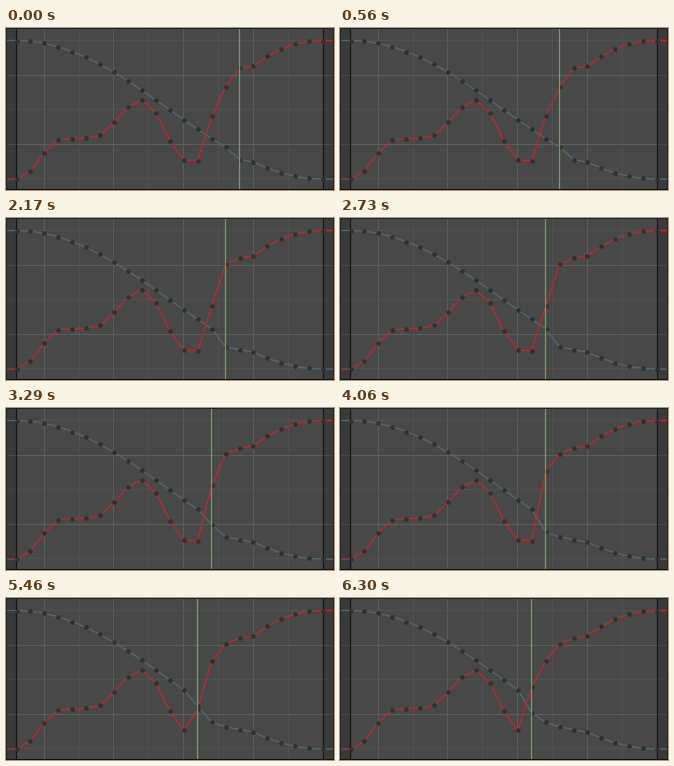
A matplotlib script that plays this animation: 328 by 162 pixels, repeating every 6440 ms.

```python
import numpy as np
import matplotlib.pyplot as plt
from matplotlib.animation import FuncAnimation
from matplotlib.patches import Rectangle

W, H, DPI = 328, 162, 100
STEP_MS, FRAMES = 70, 92
PX = 72 / DPI  # points per pixel
KEYS, LEFT, GAP = 23, 10.5, 13.94
TOP, BOTTOM = 12.5, 151.2

plt.rcParams["path.snap"] = False


def smooth(t):
    return (1 - np.cos(np.pi * t)) / 2


def ease_out(t):
    return 1 - (1 - t) ** 2.2


def eased(index, knots):
    """Values along knots (position, value, easing from this knot on)."""
    out = np.full(len(index), float(knots[-1][1]))
    for (a, ya, ease), (b, yb, _) in zip(knots, knots[1:]):
        part = (index >= a) & (index < b)
        out[part] = ya + (yb - ya) * ease((index[part] - a) / (b - a))
    return out


INDEX = np.arange(KEYS)
KEY_X = LEFT + GAP * INDEX
BLUE = TOP + (BOTTOM - TOP) * smooth(INDEX / (KEYS - 1))
RED = eased(INDEX, [(0, BOTTOM, smooth), (3.3, 111, smooth), (5.4, 110, smooth),
                    (9, 72, smooth), (12.3, 133.5, smooth), (13, 132.5, ease_out),
                    (17, 38, ease_out), (KEYS - 1, TOP, smooth)])

# key, tick of the jump, final red and blue, first and last nudge, count, slowing
EDITS = [
    (16, 0, 40, 131.5, 0, 0, 1, 1),
    (15, 8, 46, 129, 16, 31, 6, 1),
    (14, 39, 63, 124, 41, 58, 9, 1.1),
    (13, 69, 89, 115, 72, 90, 8, 1.3),
]

fig = plt.figure(figsize=(W / DPI, H / DPI), dpi=DPI, facecolor="#484848")
ax = fig.add_axes([0, 0, 1, 1])
ax.set(xlim=(0, W), ylim=(H, 0))
ax.axis("off")


def center(v):
    return np.floor(v) + 0.5


def line(xs, ys, color, width=1.0, z=1):
    return ax.plot(xs, ys, color=color, lw=width * PX, zorder=z,
                   solid_capstyle="butt")[0]


def vline(x, color, width=1.0, z=1):
    return line([x, x], [0, H], color, width, z)


def box(x, y, w, h, color, z):
    ax.add_patch(Rectangle((x, y), w, h, fc=color, ec="none", zorder=z))


def curve(color, width, z):
    path = line([], [], color, width, z)
    dots, = ax.plot([], [], "o", ms=4.6 * PX, mfc="#303030", mec="none", zorder=6)
    return path, dots


# Grid, with the area outside the frame range dimmed
for k in range(8):
    vline(center(LEFT + GAP * (2 + 2.5 * k) - 0.1), "#4f4f4f" if k % 2 else "#5c5c5c")
for k in range(5):
    y = center(TOP + 34.6 * k)
    line([0, W], [y, y], "#5c5c5c" if k % 2 else "#505050")
for x in (0, 318):
    box(x, 0, 10, H, "#00000030", 2)
for x in (10.5, 317.5):
    vline(x, "#141414", 1.2, 3)

blue = curve("#506972", 1.3, 4)
red = curve("#b02c34", 1.5, 5)
playhead = vline(0, "#68ab3c", 1.3, 7)

for x, y, w, h in ((0, 0, W, 1), (0, 0, 1, H), (327, 0, 1, H)):
    box(x, y, w, h, "#222222", 8)
box(0, 161, W, 1, "#101010", 8)


def place(parts, ys):
    path, dots = parts
    path.set_data([0, *KEY_X, W], [ys[0], *ys, ys[-1]])
    dots.set_data(KEY_X, ys)


def update(tick):
    r, b = RED.copy(), BLUE.copy()
    for key, jump, r_end, b_end, first, last, count, slow in EDITS:
        if tick >= jump:
            current = key
        nudges = first + (last - first) * np.linspace(0, 1, count) ** slow
        done = np.mean(tick >= nudges)
        r[key] += (r_end - r[key]) * done
        b[key] += (b_end - b[key]) * done
    place(red, r)
    place(blue, b)
    x = center(KEY_X[current])
    playhead.set_xdata([x, x])
    return *red, *blue, playhead


anim = FuncAnimation(fig, update, frames=FRAMES, interval=STEP_MS,
                     repeat=True, repeat_delay=0)
plt.show()
```
